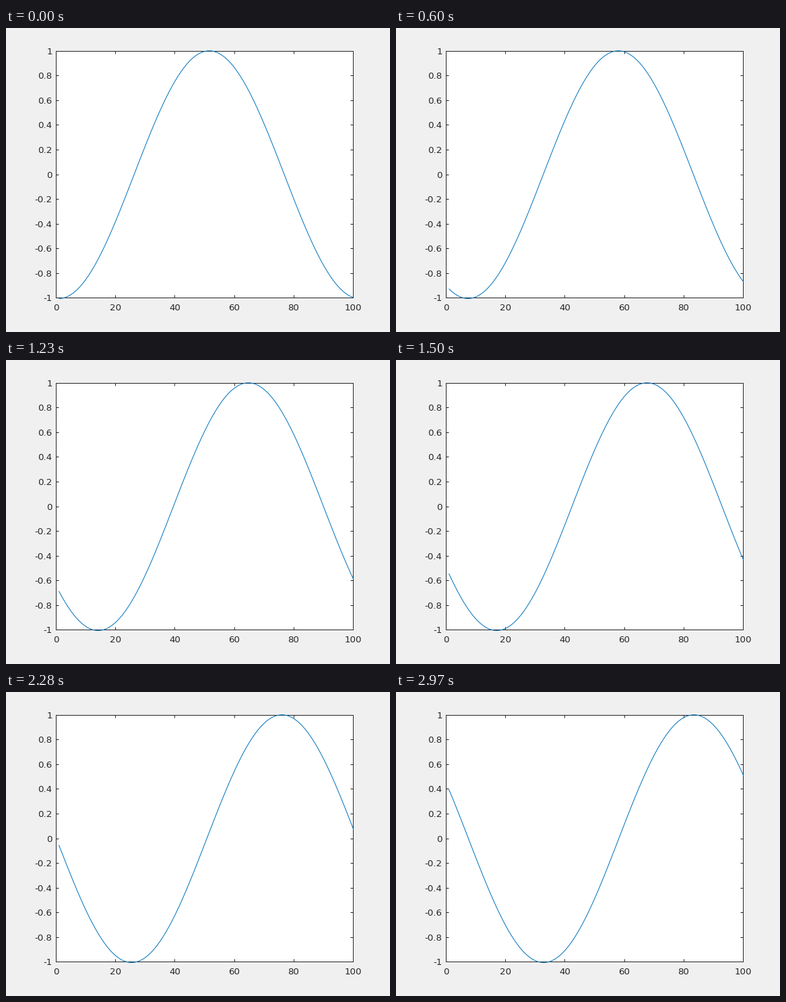
A matplotlib script that plays this animation: 570 px wide and 450 px high, repeating every 3000 ms.

```python
import numpy as np
import matplotlib.pyplot as plt
from matplotlib.animation import FuncAnimation

W, H, DPI = 570, 450, 96
FRAMES, INTERVAL = 100, 30
INK = "#262626"
PX = 72 / DPI  # one pixel in points

plt.rcParams.update({
    "font.family": "DejaVu Sans",
    "font.size": 10,
    "axes.unicode_minus": False,
    "axes.linewidth": PX,
    "axes.edgecolor": INK,
})

fig = plt.figure(figsize=(W / DPI, H / DPI), dpi=DPI, facecolor="#f0f0f0")


def add_axes(left, top, right, bottom):
    """Axes over a pixel box measured from the top left corner."""
    ax = fig.add_axes([left / W, 1 - bottom / H,
                       (right - left) / W, (bottom - top) / H])
    ax.set(xlim=(0, 100), ylim=(-1, 1))
    return ax


# The frame sits on whole pixels; the curve keeps its fractional box.
frame = add_axes(74, 33.75, 515.2, 399.45)
ticks = np.linspace(-1, 1, 11)
frame.set_xticks(range(0, 101, 20))
frame.set_yticks(ticks, [f"{round(v, 1) + 0:g}" for v in ticks])
frame.tick_params(direction="in", length=4.4 * PX, width=PX, color=INK,
                  labelcolor=INK, top=True, right=True)
frame.tick_params(axis="x", pad=9 * PX)
frame.tick_params(axis="y", pad=5.3 * PX)

plot = add_axes(74.1, 33.75, 515.85, 400.5)
plot.axis("off")
x = np.arange(1, 101)
theta = 2 * np.pi * (x - 1) / 101
curve, = plot.plot(x, -np.cos(theta), color="#0072bd", lw=PX,
                   clip_on=False, solid_capstyle="butt")


def update(i):
    curve.set_ydata(-np.cos(theta - 0.02 * i))
    return curve,


anim = FuncAnimation(fig, update, frames=FRAMES, interval=INTERVAL,
                     repeat=True, repeat_delay=0)
plt.show()
```
